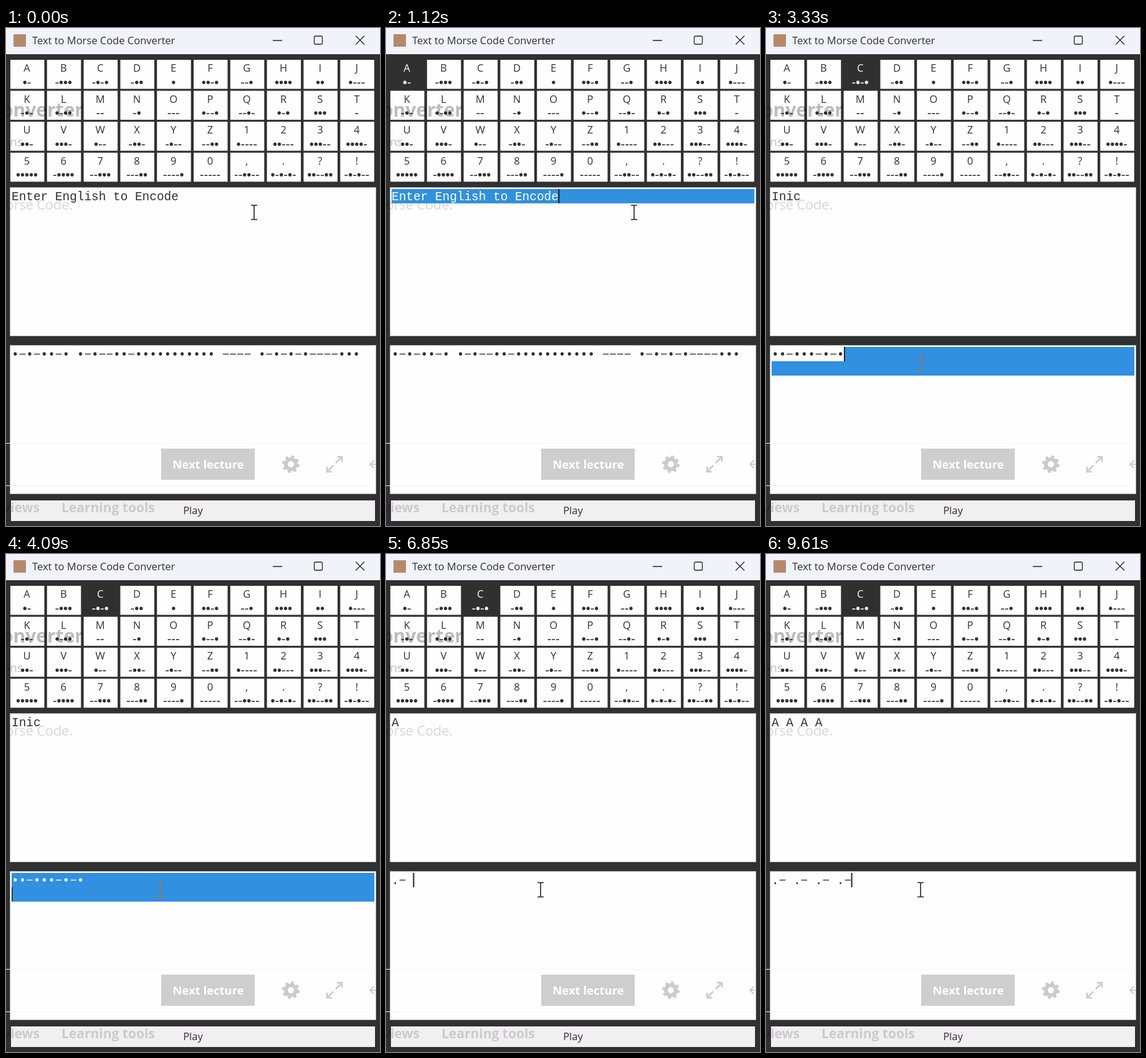
These frames come from a looping animation (600 by 798 pixels, 10 s). An HTML page:

```html
<!DOCTYPE html>
<html lang="en">
<head>
<meta charset="utf-8">
<title>Text to Morse Code Converter</title>
<style>
  html, body { margin: 0; width: 100%; height: 100%; overflow: hidden; background: #303030; }
  svg { display: block; }
  text { font: 16.5px "Open Sans", sans-serif; fill: #303032; white-space: pre; }
  .mid { text-anchor: middle; }
  .end { text-anchor: end; }
  .code { font: 20px "Liberation Sans", sans-serif; }
  .mono { font: 19.42px "Liberation Mono", monospace; }
  .light { fill: #fff; }
  .bold { font-weight: 700; }
  .ghost text { fill: #000; }
</style>
</head>
<body>
<svg width="600" height="798" viewBox="0 0 600 798">
  <rect width="600" height="798" fill="#303030"/>
  <rect width="600" height="42" fill="#f1f3fa"/>
  <rect x="12" y="10" width="20" height="20" fill="#b5896c"/>
  <text x="42" y="26">Text to Morse Code Converter</text>
  <g fill="none" stroke="#252525" stroke-width="1.3">
    <path d="M428 20H443M561 12.5L575 26.500M575 12.5L561 26.5"/>
    <rect x="494.500" y="13" width="13" height="13" rx="2"/>
  </g>
  <g id="keys"></g>
  <g fill="#fefefe" stroke="#a5a5a5">
    <rect x="6.500" y="255.500" width="587" height="238"/>
    <rect x="6.500" y="508.500" width="587" height="238"/>
  </g>
  <rect x="8" y="757" width="584" height="33" fill="#f1eff1"/>
  <g class="ghost">
    <g opacity=".15">
      <text class="end bold" x="124" y="142" style="font-size:30px">Converter</text>
      <text class="end" x="27" y="189" style="font-size:19px">ons</text>
      <text class="end" x="107" y="291" style="font-size:21.500px">Morse Code.</text>
      <text class="end bold" x="54" y="776" style="font-size:21px">Reviews</text>
      <text class="bold" x="89" y="776" style="font-size:21px">Learning tools</text>
    </g>
    <path d="M0 665.500H594M0 733.500H594" stroke="#f4f4f5"/>
    <rect x="249" y="674" width="150" height="50" fill="#cecece"/>
    <g fill="none" stroke="#cbcbcb">
      <circle cx="457" cy="699" r="8" stroke-width="6"/>
      <circle cx="457" cy="699" r="12" stroke-width="4" stroke-dasharray="4.700 4.725"/>
      <path d="M529 697L539 687M531 687H539V695M525 701L515 711M515 703V711H523" stroke-width="2.500"/>
      <path d="M594 699H584M590 693L584 699L590 705" stroke-width="2"/>
    </g>
  </g>
  <text class="mid bold light" x="324.500" y="706" style="font-size:18.500px">Next lecture</text>
  <text class="mid" x="300" y="779">Play</text>
  <g id="panes"></g>
</svg>
<script>
const LOOP = 10000, CHAR = 11.65, LINE = 23, LEFT = 9, TOP = 258, BOTTOM = 511;
const DARK = '#303030', BLUE = '#3190df';
const letters = [...'ABCDEFGHIJKLMNOPQRSTUVWXYZ1234567890,.?!'];
const codes = ('.- -... -.-. -.. . ..-. --. .... .. .--- -.- .-.. -- -. --- .--. --.- .-. ... - ' +
  '..- ...- .-- -..- -.-- --.. .---- ..--- ...-- ....- ' +
  '..... -.... --... ---.. ----. ----- --..-- .-.-.- ..--.. -.-.--').split(' ');

const prompt = 'Enter English to Encode', word = 'Inic', typedCode = '.- .- .- .-';
const wordTimes = [1360, 1480, 1600, 1720];
const codeTimes = [6180, 6500, 6820, 7090, 7300, 7730, 7900, 8100, 8670, 8800, 8930];
const caretOff = [[2240, 2640], [3760, 4090], [4700, 5000], [5640, 5910], [9300, 9610]];
const selectTop = 1060, moveStart = 2640, moveEnd = 3240, clickBottom = 3300, selectAll = 3760, clear = 4700;

const bullets = (s, dash) => s.replace(/\./g, '•').replace(/-/g, dash);
const encode = s => bullets([...s.toUpperCase()].map(c => codes[letters.indexOf(c)] || ' ').join(''), '−');
const decode = s => s.split(' ').map(c => letters[codes.indexOf(c)] || '').join(' ');
const typed = (s, times, t) => s.slice(0, times.filter(at => at <= t).length);

const rect = (x, y, w, h, fill) => `<rect x="${x}" y="${y}" width="${w}" height="${h}" fill="${fill}"/>`;
const text = (x, y, s, cls) => `<text x="${x}" y="${y}" class="${cls}">${s}</text>`;
const line = (top, s, light) => text(LEFT, top + 17.5, s, 'mono' + (light ? ' light' : ''));
const caret = (top, col) => rect(LEFT + col * CHAR - (col ? 0.6 : 0), top, col ? 2 : 1.5, LINE, '#222');
const beam = (x, y, color) => `<path d="M${x - 5} ${y - 11.5}H${x - 1}L${x} ${y - 10.5}L${x + 1} ${y - 11.5}H${x + 5}` +
  `M${x} ${y - 11}V${y + 11}M${x - 5} ${y + 11.5}H${x - 1}L${x} ${y + 10.5}L${x + 1} ${y + 11.5}H${x + 5}" ` +
  `fill="none" stroke="${color}" stroke-width="1.6"/>`;

function drawKeys(active) {
  return letters.map((c, i) => {
    const x = 7 + (i % 10) * 58.8, y = 51 + Math.floor(i / 10) * 49.6, on = c === active;
    const cls = 'mid' + (on ? ' light' : '');
    return rect(x, y, 54.5, 46.5, on ? DARK : '#fefefe') +
      text(x + 26.5, y + 19, c, cls) + text(x + 26.5, y + 42.5, bullets(codes[i], '-'), cls + ' code');
  }).join('');
}

function activeKey(t) {
  const entered = typed(word, wordTimes, t);
  return entered ? entered.slice(-1).toUpperCase() : t >= selectTop ? 'A' : '';
}

function drawPanes(t) {
  const entered = typed(word, wordTimes, t), code = typed(typedCode, codeTimes, t);
  const upper = code ? decode(code) : entered || prompt;
  const lower = t >= clear ? code : encode(upper);
  const topSelected = t >= selectTop && !entered;
  const bottomSelected = t >= clickBottom && t < clear, all = t >= selectAll;
  let out = '';

  if (topSelected) out += rect(LEFT, TOP, 582, LINE, BLUE);
  if (bottomSelected) {
    const start = all ? LEFT : LEFT + lower.length * CHAR;
    out += rect(start, BOTTOM, 591 - start, LINE, BLUE) + rect(LEFT, BOTTOM + LINE, 582, LINE, BLUE);
  }
  out += line(TOP, upper, topSelected) +
    line(BOTTOM, lower.replace(/-/g, '−'), bottomSelected && all);

  if (t >= selectTop && !caretOff.some(([a, b]) => t >= a && t < b)) {
    if (t < clickBottom) out += caret(TOP, upper.length);
    else if (bottomSelected && all) out += caret(BOTTOM + LINE, 0);
    else out += caret(BOTTOM, lower.length);
  }

  const p = Math.min(1, Math.max(0, (t - moveStart) / (moveEnd - moveStart)));
  const ease = p * p * (3 - 2 * p);
  return out + beam(398 - 150 * ease, 295.5 + 242.5 * ease, bottomSelected ? '#a2765c' : '#222');
}

const shown = {};
function update(id, html) {
  if (shown[id] !== html) document.getElementById(id).innerHTML = shown[id] = html;
}

function frame() {
  const t = performance.now() % LOOP;
  update('keys', drawKeys(activeKey(t)) +
    '<text class="end bold" x="124" y="142" style="font-size:30px" opacity=".15">Converter</text>' +
    '<text class="end" x="27" y="189" style="font-size:19px" opacity=".15">ons</text>');
  update('panes', drawPanes(t));
  requestAnimationFrame(frame);
}
frame();
</script>
</body>
</html>
```
